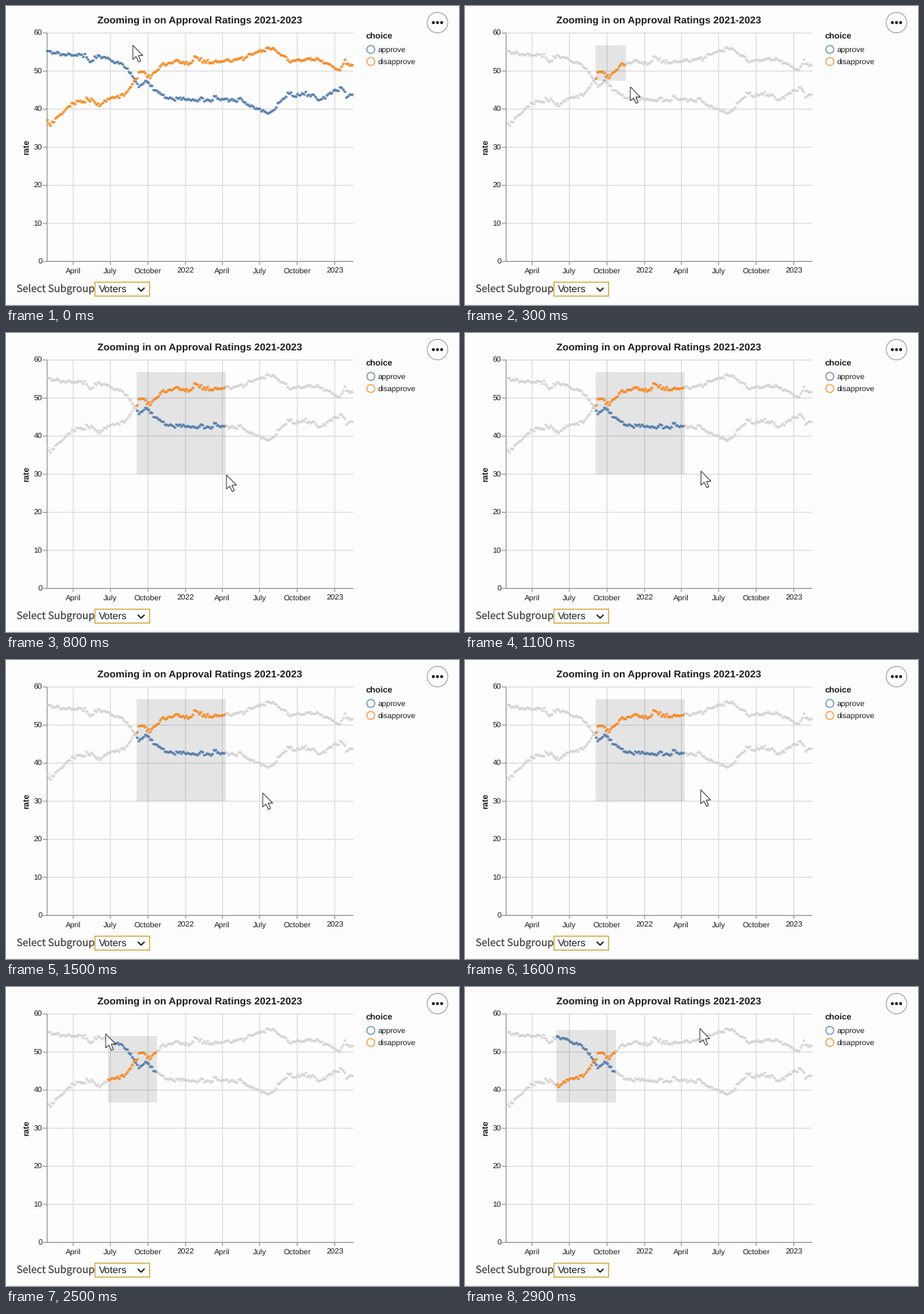
Write a matplotlib script that moves like this. It is 600 px wide and 396 px high and loops after 3 s.

```python
import numpy as np
import matplotlib.pyplot as plt
from matplotlib.animation import FuncAnimation
from matplotlib.colors import to_rgba
from matplotlib.patches import Circle, Polygon, Rectangle

W, H, DPI = 600, 396, 100
FRAMES, INTERVAL = 30, 100
LEFT, RIGHT, TOP, BOTTOM = 54, 460, 35.5, 338
DAY = 0.5414  # pixels per day
BLUE, ORANGE, GRAY = "#4c78a8", "#f58518", "#d3d3d3"
PAPER, GRID, AXIS = "#fefdfe", "#dddddd", "#888888"
PX = 72 / DPI

plt.rcParams["text.hinting"] = "none"
fig = plt.figure(figsize=(W / DPI, H / DPI), dpi=DPI, facecolor=PAPER)
ax = fig.add_axes([0, 0, 1, 1])
ax.set_xlim(0, W)
ax.set_ylim(H, 0)
ax.axis("off")


def label(x, y, text, size, font="Liberation Sans", **kw):
    kw.setdefault("color", "#1c1c1c")
    ax.text(x, y, text, fontsize=size * PX, family=font, **kw)


def line(xs, ys, color, width=1, z=1):
    ax.plot(xs, ys, color=color, lw=width * PX, zorder=z,
            solid_capstyle="butt", snap=False)


def draw_axes():
    quarters = ["April", "July", "October"]
    names = quarters + ["2022"] + quarters + ["2023"]
    first_days = np.cumsum([0, 91, 92, 92, 90, 91, 92, 92])
    for x, name in zip(89 + DAY * first_days, names):
        line([x, x], [TOP, BOTTOM], GRID, 1.3)
        line([x, x], [BOTTOM, BOTTOM + 5], AXIS)
        label(x, 354, name, 10.2, ha="center")
    for rate in range(0, 61, 10):
        y = BOTTOM + 0.3 - (BOTTOM - TOP) * rate / 60
        line([LEFT, RIGHT], [y, y], GRID, 1.3)
        line([LEFT - 5, LEFT], [y, y], AXIS)
        label(48, y + 3.6, str(rate), 10.4, ha="right")
    line([LEFT + 0.4] * 2, [TOP, BOTTOM], AXIS, z=2)
    line([LEFT, RIGHT], [BOTTOM + 0.3] * 2, AXIS, z=2)
    label(256.3, 23.5, "Zooming in on Approval Ratings 2021-2023", 13.2,
          weight="bold", ha="center")
    label(27.5, 187, "rate", 11.2, weight="bold", rotation=90,
          ha="center", va="center")


def draw_legend():
    label(477, 44.3, "choice", 11.2, weight="bold")
    rings = []
    for y, name, color in [(57.5, "approve", BLUE), (73.5, "disapprove", ORANGE)]:
        ring = Circle((483.2, y), 5.2, fill=False, ec=color, lw=1.5 * PX)
        rings.append(ax.add_patch(ring))
        label(493, y + 3.5, name, 10.25)
    return rings


def draw_controls():
    ax.add_patch(Circle((571.5, 22), 13.6, fc="#fdfdfd", ec="#999999", lw=PX))
    for x in (566, 571.5, 577):
        ax.add_patch(Circle((x, 22), 2, color="#222222", lw=0))
    label(14.5, 379.5, "Select Subgroup", 13.45, "Noto Sans CJK JP",
          color="#444444")
    ax.add_patch(Rectangle((117.8, 365.8), 72.4, 18.4, fc="white",
                           ec="#d2b04a", lw=1.5 * PX, snap=False))
    label(122.5, 379.9, "Voters", 13.2)
    line([174.5, 179, 183.5], [373.2, 377.6, 373.2], "#222222", 1.8, z=3)
    line([0, W], [395, 395], "#efeeef")


# Turning points of both trends, in pixels
APPROVE = [(54, 61), (104, 65), (113, 74), (121, 65), (150, 76), (162, 86),
           (175, 107), (185, 100), (205, 119), (250, 126), (278, 122),
           (310, 125), (348, 143), (372, 117), (405, 118), (414, 125),
           (444, 107), (450, 119), (460, 116)]
DISAPPROVE = [(54, 150), (58, 158), (80, 134), (113, 123), (124, 133),
              (134, 122), (157, 118), (178, 87), (190, 93), (208, 76),
              (245, 74), (251, 68), (265, 75), (310, 71), (347, 54),
              (375, 72), (412, 70), (443, 85), (448, 74), (460, 79)]


def daily(trend, rng):
    """Daily points around a trend, with noise that holds for some days."""
    x = np.arange(LEFT, RIGHT, DAY)
    day = np.arange(len(x))
    y = np.interp(x[day // 4 * 4], *np.transpose(trend))
    for hold, spread in ((1, 0.5), (4, 1.1), (12, 0.9)):
        y += rng.normal(0, spread, len(x))[day // hold]
    return np.column_stack([x, y])


rng = np.random.default_rng(7)
series = [daily(APPROVE, rng), daily(DISAPPROVE, rng)]
points = np.vstack(series)
bright = np.repeat([to_rgba(BLUE, 0.5), to_rgba(ORANGE, 0.5)],
                   len(series[0]), axis=0)
muted = np.array(to_rgba(GRAY, 0.5))

draw_axes()
rings = draw_legend()
draw_controls()
dots = ax.scatter(*points.T, s=(2.9 * PX) ** 2, c=bright, linewidths=0, zorder=5)
brush = ax.add_patch(Rectangle((0, 0), 0, 0, fc="#333333", alpha=0.12,
                               lw=0, zorder=4))
ARROW = np.array([(0, 0), (0, 18.7), (4.3, 14.8), (7.6, 22), (10.4, 20.7),
                  (7.3, 13.7), (13.2, 13.5)])
cursor = ax.add_patch(Polygon(ARROW, fc="white", ec="#3a3a3a",
                              lw=PX, zorder=10))

# Paths as (frame, x, y)
POINTER = [(0, 168, 52), (1, 173, 52), (5, 265, 162), (8, 292, 188),
           (15, 340, 176), (20, 201, 155), (25, 132, 62), (26, 121, 56),
           (29, 311, 55)]
DRAGS = [[(1, 173, 52), (5, 253, 146), (8, 291, 187)],
         [(20, 200, 153), (25, 135, 65), (26, 121, 57)]]


def along(keys, i):
    t, x, y = np.transpose(keys)
    return np.array([np.interp(i, t, x), np.interp(i, t, y)])


def update(i):
    cursor.set_xy(ARROW + along(POINTER, i))
    drag = DRAGS[i >= 20]
    corners = np.array([drag[0][1:], along(drag, i)])
    low, high = corners.min(axis=0), corners.max(axis=0)
    brush.set_bounds(*low, *(high - low))
    idle = i < 2
    inside = np.all((points >= low) & (points <= high), axis=1) | idle
    dots.set_facecolors(np.where(inside[:, None], bright, muted))
    for ring in rings:
        ring.set_alpha(0.75 if inside.any() else 0.6)
    return dots, brush, cursor, *rings


anim = FuncAnimation(fig, update, frames=FRAMES, interval=INTERVAL,
                     repeat=True, repeat_delay=0, blit=False)
plt.show()
```
